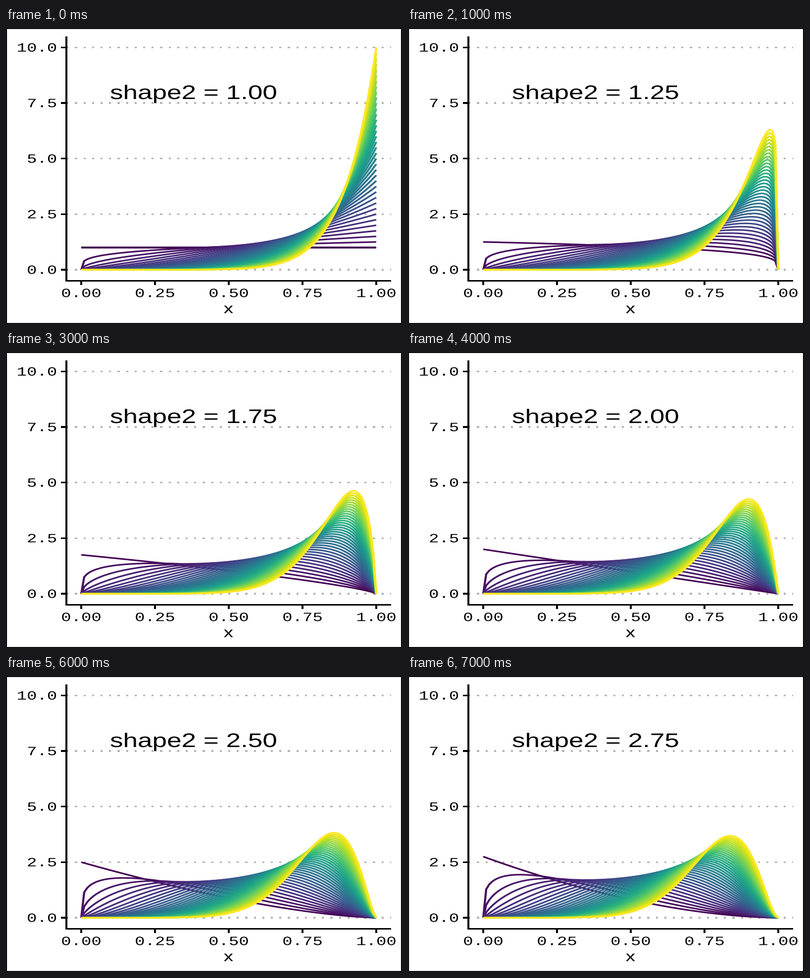
These frames come from a looping animation (800x600 px, 8 s). A matplotlib script:

```python
import math

import matplotlib.pyplot as plt
import numpy as np
from matplotlib.animation import FuncAnimation
from matplotlib.collections import PolyCollection
from matplotlib.patches import PathPatch, Rectangle
from matplotlib.textpath import TextPath
from matplotlib.transforms import Affine2D

# The plot is laid out on a square stage that is shown at 4:3.
SIDE = 600
X0, X_UNIT = 114, 447
Y0, Y_UNIT = 110, 45.06
LEFT, RIGHT = X0 - 0.05 * X_UNIT, X0 + 1.05 * X_UNIT
BOTTOM, TOP = Y0 - 0.5 * Y_UNIT, Y0 + 10.5 * Y_UNIT
LINE = 3.2
TICK = 8.4
MONO, SANS = "Liberation Mono", "Liberation Sans"
LABEL_SIZE = 25.5

SHAPES1 = np.arange(1, 10.01, 0.25)
SHAPES2 = np.arange(1, 2.76, 0.25)
X = np.linspace(0, 1, 101)

fig = plt.figure(figsize=(8, 6), dpi=100, facecolor="white")
ax = fig.add_axes([0, 0, 1, 1])
ax.set_xlim(0, SIDE)
ax.set_ylim(0, SIDE)
ax.axis("off")


def px(x):
    return X0 + X_UNIT * x


def py(y):
    return Y0 + Y_UNIT * y


def box(x, y, w, h, color="black", zorder=3):
    ax.add_patch(Rectangle((x, y), w, h, fc=color, lw=0, zorder=zorder))


def hline(x1, x2, y, **style):
    box(x1, y - LINE / 2, x2 - x1, LINE, **style)


def vline(x, y1, y2):
    box(x - LINE / 2, y1, LINE, y2 - y1)


def text_path(text, x, y, size, family):
    path = TextPath((0, 0), text, size=size, prop={"family": family})
    return path.transformed(Affine2D().translate(x, y))


def add_text(text, x, y, size, family):
    patch = PathPatch(text_path(text, x, y, size, family),
                      fc="black", lw=0, zorder=4)
    ax.add_patch(patch)
    return patch


def label_width(text):
    return 0.6 * LABEL_SIZE * len(text)


def beta_pdf(x, a, b):
    scale = math.gamma(a + b) / (math.gamma(a) * math.gamma(b))
    return scale * x ** (a - 1) * (1 - x) ** (b - 1)


def ribbon(x, y):
    """Outline of a mitred stroke along a polyline."""
    pts = np.column_stack([x, y])
    step = np.diff(pts, axis=0)
    step /= np.hypot(step[:, 0], step[:, 1])[:, None]
    normal = np.column_stack([-step[:, 1], step[:, 0]])
    before = np.vstack([normal[:1], normal])
    after = np.vstack([normal, normal[-1:]])
    mid = before + after
    mid /= np.hypot(mid[:, 0], mid[:, 1])[:, None]
    cos = np.maximum((mid * after).sum(axis=1), 0.5)
    offset = mid / cos[:, None] * LINE / 2
    return np.vstack([pts + offset, (pts - offset)[::-1]])


def title(shape2):
    return text_path(f"shape2 = {shape2:.2f}", 157.5, 456, 39.8, SANS)


# Dotted grid, ticks and labels
for value in np.arange(0, 10.1, 2.5):
    y = py(value)
    for x in np.arange(LEFT, RIGHT, 4 * LINE + 0.1):
        hline(x, min(x + LINE, RIGHT), y, color="#b3b3b3", zorder=1)
    hline(LEFT - TICK, LEFT, y)
    label = f"{value:.1f}"
    add_text(label, 77.4 - label_width(label), y - 8.4, LABEL_SIZE, MONO)

for value in np.arange(0, 1.1, 0.25):
    x = px(value)
    vline(x, BOTTOM - TICK, BOTTOM)
    label = f"{value:.2f}"
    add_text(label, x - label_width(label) / 2, 54.6, LABEL_SIZE, MONO)

add_text("x", 329.8, 22, 29, SANS)

# Axes and outer border
hline(LEFT - LINE / 2, RIGHT, BOTTOM)
vline(LEFT, BOTTOM, TOP)
for edge in (0, SIDE):
    hline(0, SIDE, edge)
    vline(edge, 0, SIDE)

colors = plt.get_cmap("viridis")((SHAPES1 - 1) / 9)
curves = PolyCollection([], facecolors=colors, linewidths=0, zorder=2)
ax.add_collection(curves, autolim=False)
heading = PathPatch(title(1), fc="black", lw=0, zorder=4)
ax.add_patch(heading)


def draw(i):
    shape2 = SHAPES2[i]
    curves.set_verts([ribbon(px(X), py(beta_pdf(X, a, shape2)))
                      for a in SHAPES1])
    heading.set_path(title(shape2))
    return curves, heading


anim = FuncAnimation(fig, draw, frames=len(SHAPES2), interval=1000,
                     repeat=True, repeat_delay=0)
plt.show()
```
